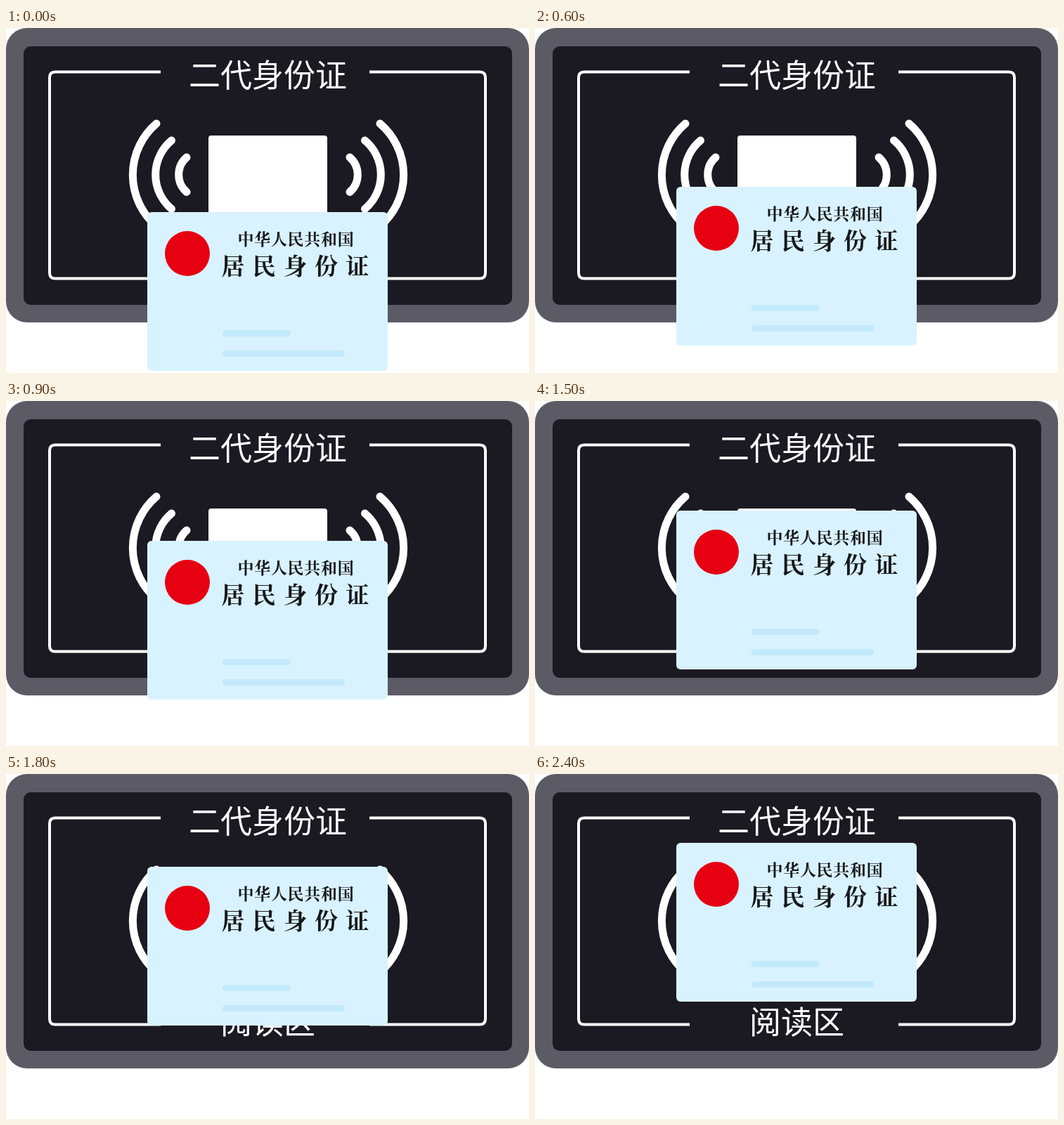
Write an HTML page without scripts that moves like this. It is 744x491 px and loops after 2700 ms.

```html
<!DOCTYPE html>
<html lang="zh-CN">
<head>
<meta charset="utf-8">
<title>读卡演示</title>
<style>
html, body { margin: 0; width: 100%; height: 100%; overflow: hidden; background: #fff; }
svg { display: block; width: 744px; height: 491px; }
.label { font: 400 45px "Noto Sans CJK SC", sans-serif; fill: #fff; text-anchor: middle; }
.line { fill: none; stroke: #fff; stroke-width: 4; }
.wave { fill: none; stroke: #fff; stroke-width: 11; stroke-linecap: round; }
.print { font-family: "Noto Serif CJK SC", "Noto Sans CJK SC", serif; font-weight: 700; fill: #14171a; }
.nation { font-size: 23px; letter-spacing: .7px; }
.kind { font-size: 33px; letter-spacing: 11.2px; }
.bar { fill: #c2eafc; }
.card { animation: insert 2.7s step-end infinite; }
@keyframes insert {
  0% { transform: translate(201px, 262px); }
  11.111% { transform: translate(201px, 244px); }
  22.222% { transform: translate(201px, 226px); }
  33.333% { transform: translate(201px, 199px); }
  44.444% { transform: translate(201px, 178px); }
  55.555% { transform: translate(201px, 156px); }
  66.666% { transform: translate(201px, 132px); }
  77.777% { transform: translate(201px, 109px); }
  88.888%, 100% { transform: translate(201px, 98px); }
}
</style>
</head>
<body>
<svg viewBox="0 0 744 491">
  <defs>
    <g id="waves" class="wave">
      <path d="M257 184A32.8 32.8 0 0 0 257 233.5"/>
      <path d="M235.500 160A63.500 63.500 0 0 0 235.500 257.500"/>
      <path d="M214 136A96 96 0 0 0 214 282"/>
    </g>
  </defs>

  <rect width="744" height="419" rx="30" fill="#5c5b65"/>
  <rect x="25" y="26" width="695" height="368" rx="10" fill="#1b1a23"/>
  <path class="line" d="M220 62.500H70Q62 62.500 62 70.500V348.500Q62 356.500 70 356.500H220M517 62.500H674Q682 62.500 682 70.500V348.500Q682 356.500 674 356.500H517"/>
  <text class="label" x="372.500" y="84">二代身份证</text>
  <text class="label" x="372.500" y="370">阅读区</text>

  <rect x="288" y="153" width="169" height="112" rx="4" fill="#fff"/>
  <use href="#waves"/>
  <use href="#waves" transform="translate(746) scale(-1 1)"/>

  <g class="card">
    <rect width="342" height="226" rx="6" fill="#d9f2ff"/>
    <circle cx="57" cy="59" r="32" fill="#e60012"/>
    <text class="print nation" x="128.500" y="47">中华人民共和国</text>
    <text class="print kind" x="105.500" y="88.500">居民身份证</text>
    <rect class="bar" x="107" y="168" width="97" height="9" rx="4.500"/>
    <rect class="bar" x="107" y="197" width="174" height="9" rx="4.500"/>
  </g>
</svg>
</body>
</html>
```
